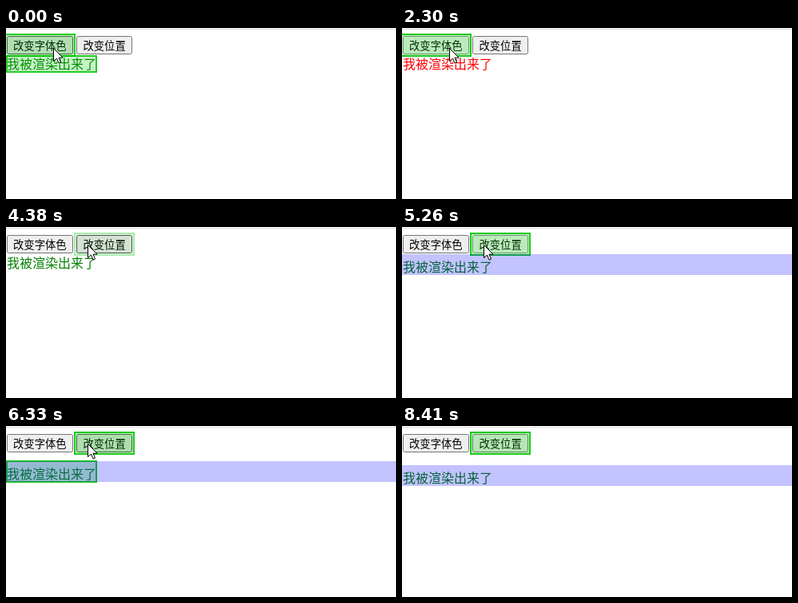
An HTML page with a canvas for the animation above (8.51 s loop, 488 by 214 pixels).

```html
<!DOCTYPE html>
<html lang="zh">
<head>
<meta charset="utf-8">
<style>
html, body { margin: 0; width: 100%; height: 100%; overflow: hidden; background: #fff; }
canvas { display: block; }
</style>
</head>
<body>
<canvas id="stage" width="488" height="214"></canvas>
<script>
const W = 488, H = 214, LOOP = 8510, FADE = 640;
const canvas = document.getElementById('stage');
const ctx = canvas.getContext('2d');
const scale = window.devicePixelRatio || 1;
canvas.width = W * scale;
canvas.height = H * scale;
canvas.style.width = W + 'px';
canvas.style.height = H + 'px';

const FONT = '"Noto Sans CJK SC", "Noto Sans CJK", sans-serif';
const buttons = [
  { x: 1, w: 83, label: '改变字体色', tx: 9 },
  { x: 88, w: 70, label: '改变位置', tx: 96.4 }
];
const looks = {
  plain: ['#efefef', '#767676'],
  hover: ['#e5e5e5', '#4f4f4f'],
  active: ['#f5f5f5', '#8d8d8d']
};

// Screen refreshes: first, last, count
const bursts = [
  [150, 690, 5], [1120, 1900, 7], [2300, 3110, 7], [3390, 4380, 8],
  [4530, 5530, 8], [5660, 6600, 8], [6750, 7680, 8], [7800, 8110, 3], [8410, 8410, 1]
];

// Time, button, action
const events = [
  [-40, 0, 'up'],
  [1120, 0, 'down'], [1245, 0, 'up'],
  [2300, 0, 'down'], [2430, 0, 'up'],
  [3810, 0, 'leave'], [3950, 1, 'enter'],
  [4530, 1, 'down'], [4665, 1, 'up'],
  [5240, 1, 'down'], [5380, 1, 'up'],
  [6190, 1, 'down'], [6325, 1, 'up'],
  [7010, 1, 'down'], [7140, 1, 'up'],
  [7535, 1, 'leave'], [8410, 1, 'blur']
];
const lookFor = { up: 'hover', enter: 'hover', down: 'active', leave: 'plain', blur: 'plain' };

function refreshTime(t) {
  let q = 0;
  for (const [a, b, n] of bursts) {
    if (t < a) break;
    const step = (b - a) / (n - 1) || 1;
    q = a + step * Math.min(n - 1, Math.floor((t - a + 12) / step));
  }
  return q;
}

function stateAt(t) {
  const s = { look: ['plain', 'plain'], red: true, moves: 0 };
  for (const [at, id, action] of events) {
    if (at > t) break;
    s.look[id] = lookFor[action];
    s.flash = { at, id, text: action === 'up' };
    if (action === 'up') {
      if (id === 0) s.red = !s.red;
      else s.moves++;
    }
  }
  return s;
}

function cursorAt(t) {
  if (t >= 7680) return null;
  if (t > 7260) {
    const p = (t - 7260) / 420;
    return [102 + 8 * p, 22 + 192 * p ** 3];
  }
  const p = Math.min(1, Math.max(0, (t - 3390) / 710));
  return [Math.round(59 + 43 * p), Math.round(25 - 3 * p)];
}

function drawText(text, x, y, size, color) {
  ctx.font = size + 'px ' + FONT;
  ctx.fillStyle = color;
  ctx.fillText(text, x, y);
}

function drawButton({ x, w, label, tx }, look) {
  const [fill, line] = looks[look];
  ctx.beginPath();
  ctx.roundRect(x + 0.5, 10.5, w - 1, 22, 2);
  ctx.fillStyle = fill;
  ctx.fill();
  ctx.lineWidth = 1;
  ctx.strokeStyle = line;
  ctx.stroke();
  drawText(label, tx, 27, 13.333, '#000');
}

function drawFlash(x, y, w, h, k) {
  ctx.fillStyle = `rgba(0,195,0,${0.235 * k})`;
  ctx.fillRect(x, y, w, h);
  ctx.lineWidth = 2;
  ctx.strokeStyle = `rgba(0,195,0,${0.86 * k})`;
  ctx.strokeRect(x + 1, y + 1, w - 2, h - 2);
}

function drawCursor([x, y]) {
  const pts = [[0, 0], [0, 16], [4, 12.6], [6.6, 18.6], [9, 17.6], [6.5, 11.7], [11.6, 11.7]];
  ctx.beginPath();
  for (const [px, py] of pts) ctx.lineTo(x + 0.5 + px, y + 0.5 + py);
  ctx.closePath();
  ctx.fillStyle = '#fff';
  ctx.fill();
  ctx.lineWidth = 1;
  ctx.strokeStyle = '#000';
  ctx.stroke();
}

function draw(t) {
  const q = refreshTime(t);
  const s = stateAt(q);
  ctx.setTransform(scale, 0, 0, scale, 0, 0);
  ctx.fillStyle = '#fff';
  ctx.fillRect(0, 0, W, H);
  ctx.fillStyle = '#dcdcdc';
  ctx.fillRect(0, 1, W, 1);

  buttons.forEach((b, i) => drawButton(b, s.look[i]));
  drawText('我被渲染出来了', 1, 51 + 5 * s.moves, 16, s.red ? '#f00' : '#008000');

  const bandY = 29 + 5 * s.moves;
  const k = 1 - (q - s.flash.at) / FADE;
  if (k > 0.12) {
    const b = buttons[s.flash.id];
    drawFlash(b.x - 3, 7, b.w + 6, 29, k);
    if (s.flash.text) {
      if (s.moves) drawFlash(0, bandY - 1, 114, 28, k);
      else drawFlash(0, 34, 114, 22, k);
    }
  }
  if (s.moves) {
    ctx.fillStyle = 'rgba(0,0,255,0.235)';
    ctx.fillRect(0, bandY, W, 26);
  }
  const cursor = cursorAt(q);
  if (cursor) drawCursor(cursor);
}

const start = performance.now();
function tick() {
  draw((performance.now() - start) % LOOP);
  requestAnimationFrame(tick);
}
tick();
</script>
</body>
</html>
```
